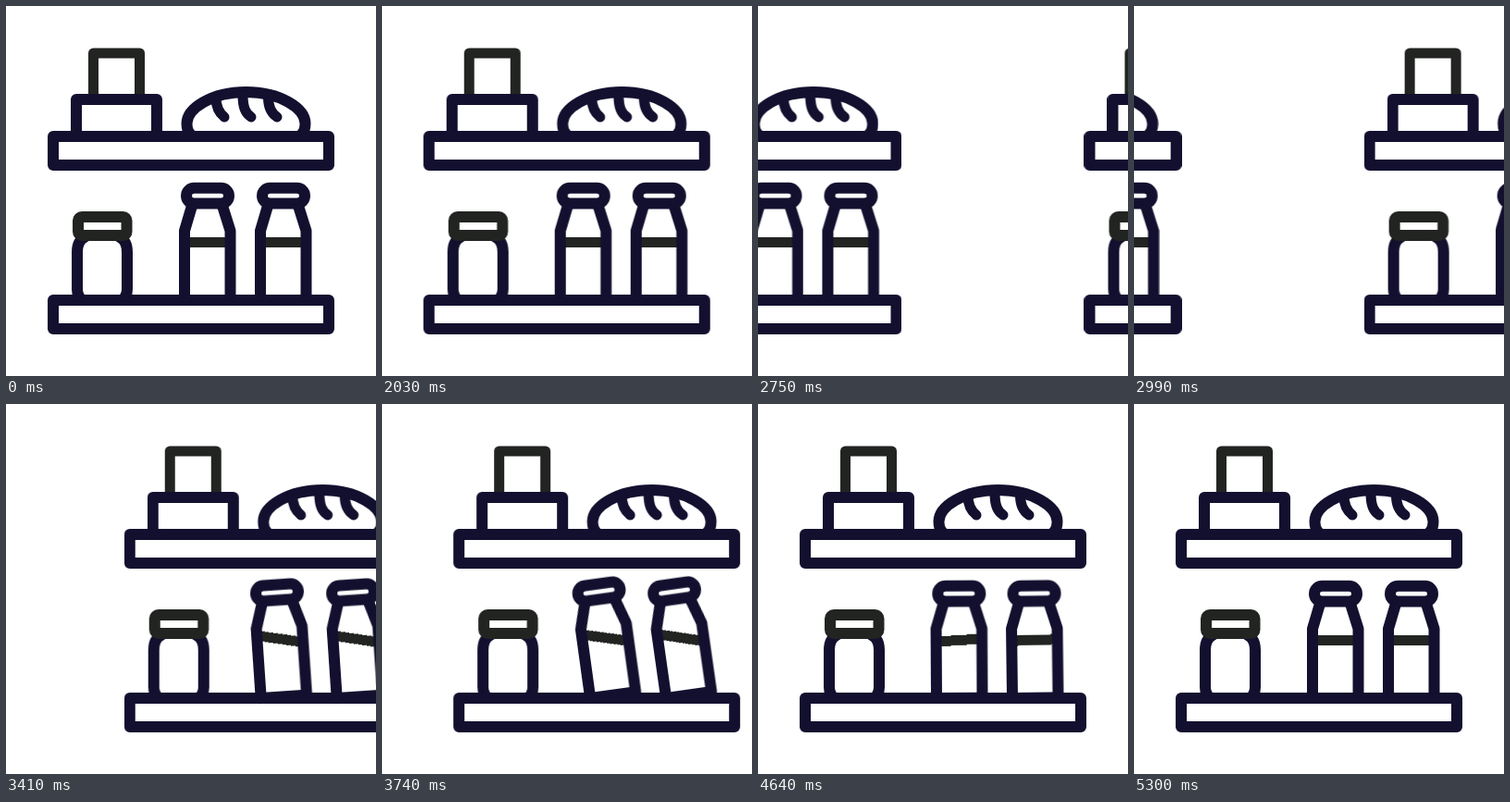
Animation, 400 px wide and 400 px high, one loop 5330 ms. Source, as an HTML page:

```html
<!DOCTYPE html>
<html lang="en">
<head>
<meta charset="utf-8">
<title>Pantry shelves</title>
<style>
  html, body { margin: 0; height: 100%; overflow: hidden; background: #fff; }
  svg { display: block; width: 100vw; height: 100vh; }
  .ink, .dark { fill: none; stroke: #13102f; stroke-width: 12; stroke-linecap: round; stroke-linejoin: round; }
  .dark { stroke: #222422; }
  .thin { stroke-width: 11; }
  .flat { stroke-linecap: butt; }

  .belt, .bottle, .liquid { animation: 5330ms infinite; }
  .belt { animation-name: slide; }
  .bottle { transform-origin: 193px 318px; animation-timing-function: cubic-bezier(.333, 0, .667, 1); }
  .liquid { transform-origin: 217.75px 255.5px; animation-timing-function: cubic-bezier(.333, 0, .667, 1); }
  .first .bottle { animation-name: lean-first; }
  .second .bottle { animation-name: lean-second; }
  .first .liquid { animation-name: slosh-first; }
  .second .liquid { animation-name: slosh-second; }

  /* 2000 ms to 4400 ms */
  @keyframes slide {
    0%, 37.52% { transform: translateX(507px); animation-timing-function: cubic-bezier(.333, 0, .3, 1); }
    82.55%, 100% { transform: none; }
  }
  @keyframes lean-first {
    0%, 56.29% { transform: rotate(0deg); }
    72.23% { transform: rotate(-8.2deg); }
    89.12%, 100% { transform: rotate(0deg); }
  }
  @keyframes lean-second {
    0%, 56.29% { transform: rotate(0deg); }
    73.17% { transform: rotate(-8.8deg); }
    90.06%, 100% { transform: rotate(0deg); }
  }
  @keyframes slosh-first {
    0%, 56.29% { transform: rotate(0deg); }
    67.54%, 77.49% { transform: rotate(15.5deg); }
    89.12% { transform: rotate(-5deg); }
    98.5%, 100% { transform: rotate(0deg); }
  }
  @keyframes slosh-second {
    0%, 56.29% { transform: rotate(0deg); }
    67.9%, 78.2% { transform: rotate(16.5deg); }
    90.06% { transform: rotate(-5deg); }
    99.44%, 100% { transform: rotate(0deg); }
  }
</style>
</head>
<body>
<svg viewBox="0 0 400 400">
  <defs>
    <path id="body" d="M201 216L193 243V318H242.5V243L234 216"/>
    <clipPath id="inside"><use href="#body"/></clipPath>
    <rect id="board" x="51" y="141" width="298" height="31"/>
  </defs>

  <g class="belt">
    <g id="shelves">
      <!-- boxes -->
      <path class="dark thin flat" d="M94.5 97V51H144.5V97"/>
      <path class="ink" d="M76 141V101H163V141"/>

      <!-- bread -->
      <path class="ink" d="M199 138C196 135 195.5 131 195.5 127C195.5 111 222 93 259.5 93S323.5 111 323.5 127C323.5 131 323 135 320 138"/>
      <path class="ink thin" d="M227 99C227 110 231 116 236 120M256 96C256 110 259 116 265 120M283.5 99C283.5 110 287 116 293 120"/>

      <!-- jar -->
      <path class="ink" d="M85 250C79 253 77 258 77 266V306C77 311 79 315 82 318M123 250C129 253 131 258 131 266V306C131 311 129 315 126 318"/>
      <rect class="dark" x="78" y="228" width="52.5" height="20" rx="4"/>

      <!-- bottles -->
      <g class="first">
        <g class="bottle">
          <g clip-path="url(#inside)"><path class="dark thin liquid" d="M180 255.5H256"/></g>
          <use href="#body" class="ink"/>
          <rect class="ink" x="195" y="196.8" width="46" height="16.8" rx="8.4"/>
        </g>
      </g>
      <g class="second" transform="translate(82 0)">
        <g class="bottle">
          <g clip-path="url(#inside)"><path class="dark thin liquid" d="M180 255.5H256"/></g>
          <use href="#body" class="ink"/>
          <rect class="ink" x="195" y="196.8" width="46" height="16.8" rx="8.4"/>
        </g>
      </g>

      <use href="#board" class="ink"/>
      <use href="#board" class="ink" y="177"/>
    </g>
    <use href="#shelves" x="-507"/>
  </g>
</svg>
</body>
</html>
```
